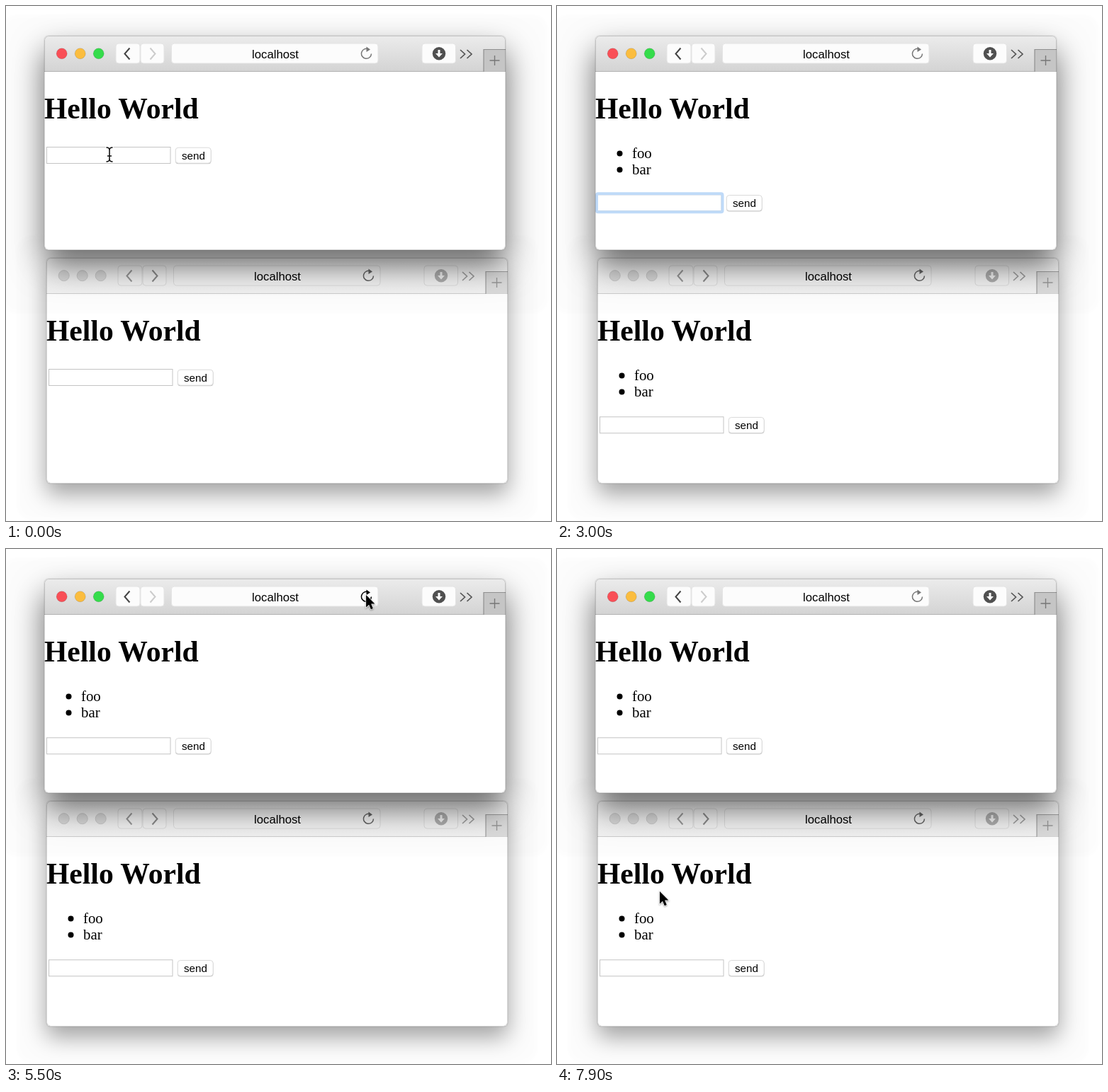
These frames come from a looping animation (769x728 px, 8000 ms). An HTML page:

```html
<!DOCTYPE html>
<html>
<head>
<meta charset="utf-8">
<style>
html, body { margin: 0; width: 100%; height: 100%; overflow: hidden; background: #fff; }
.win { position: absolute; width: 651px; border-radius: 6px; background: #fff; }
.win svg { display: block; border-radius: 6px; }
#front { left: 54px; top: 42px; height: 303px;
  box-shadow: 0 0 1px rgba(0,0,0,.6), 0 22px 45px rgba(0,0,0,.58), 0 30px 4px 60px rgba(0,0,0,.012); }
#back { left: 56.5px; top: 356px; height: 319px;
  box-shadow: 0 0 1px rgba(0,0,0,.6), 0 15px 32px rgba(0,0,0,.36), 0 10px 4px 42px rgba(0,0,0,.012); }
#pointer { position: absolute; left: 0; top: 0; }
text { font-family: "Liberation Sans", Arial, sans-serif; font-size: 15.2px; }
.page { font-family: "Liberation Serif", Times, serif; font-size: 20.8px; }
.title { font-size: 41.6px; font-weight: bold; }
.mid { text-anchor: middle; }
</style>
</head>
<body>
<div class="win" id="back"></div>
<div class="win" id="front"></div>
<svg id="pointer" width="769" height="728">
  <g id="beam" fill="none" stroke-linecap="round">
    <path id="beamShape" d="M-4-10Q0-10 0-6Q0-10 4-10M0-6V6M-4 10Q0 10 0 6Q0 10 4 10M-2.5 2H2.5" stroke="#fff" stroke-width="3.4"/>
    <use href="#beamShape" style="stroke:#000"/>
    <path d="M-4-10Q0-10 0-6Q0-10 4-10M0-6V6M-4 10Q0 10 0 6Q0 10 4 10M-2.5 2H2.5" stroke="#111" stroke-width="1.6"/>
  </g>
  <path id="arrow" d="M0 0V17.5L4 13.7 6.8 20.2 9.8 18.9 7.1 12.6H12.4Z" stroke="#fff" stroke-width="1.4"
    style="paint-order:stroke;filter:drop-shadow(0 1px 1px rgba(0,0,0,.4))"/>
</svg>
<script>
const $ = id => document.getElementById(id);
const ACTIVE = { top: '#ececec', bottom: '#d3d3d3', line: '#b2b2b2', button: '#fcfcfc', edge: '#e4e4e4',
  lights: ['#f94f57', '#fbbd3f', '#35dc4b'], rim: 'rgba(0,0,0,.12)',
  back: '#444', next: '#ccc', icon: '#505050', more: '#555', reload: '#777', tab: '#c5c5c5', tabEdge: '#8f8f8f', plus: '#777' };
const IDLE = { top: '#f6f6f6', bottom: '#f4f4f4', line: '#cfcfcf', button: '#f6f6f6', edge: '#dedede',
  lights: ['#dcdcdc', '#dcdcdc', '#dcdcdc'], rim: '#cdcdcd',
  back: '#999', next: '#8c8c8c', icon: '#b0b0b0', more: '#a0a0a0', reload: '#666', tab: '#dedede', tabEdge: '#a0a0a0', plus: '#999' };

function buildWindow(id, height, c) {
  const button = (x, w) =>
    `<rect x="${x}" y="11" width="${w}" height="28" rx="4" fill="${c.button}" stroke="${c.edge}"/>`;
  const line = (d, color, w = 1.8) => `<path d="${d}" fill="none" stroke="${color}" stroke-width="${w}"/>`;
  const item = (word, y) => `<g class="item"><circle cx="34.5" cy="${y - 6.5}" r="4"/>
    <text class="page" x="52" y="${y}">${word}</text></g>`;
  $(id).innerHTML = `<svg width="651" height="${height}">
    <linearGradient id="${id}Bar" x2="0" y2="1"><stop stop-color="${c.top}"/><stop offset="1" stop-color="${c.bottom}"/></linearGradient>
    <rect width="651" height="51" fill="url(#${id}Bar)"/>
    <rect y="50" width="651" height="1" fill="${c.line}"/>
    ${c.lights.map((f, i) => `<circle cx="${24.7 + 26 * i}" cy="25.2" r="7.5" fill="${f}" stroke="${c.rim}"/>`).join('')}
    ${button(101, 34)}${button(136, 33)}${button(179.5, 291.5)}${button(533, 47.5)}
    ${line('M120.5 17.5L113.5 25.5 120.5 33.5', c.back, 2)}${line('M149.5 17.5L156.5 25.5 149.5 33.5', c.next, 2)}
    <text class="mid" x="326" y="31.5" style="font-size:16.7px">localhost</text>
    <g class="reload" color="${c.reload}">
      ${line('M457.5 19A7 7 0 1 0 461.5 25.5', 'currentColor', 1.5)}
      <path d="M454.5 15.5L460 19.5 454.5 23Z" fill="currentColor"/>
    </g>
    <circle cx="557" cy="25.2" r="9.2" fill="${c.icon}"/>
    <path d="M555.5 20H558.5V25H562L557 30.5 552 25H555.5Z" fill="${c.button}"/>
    ${line('M587 20L593.5 26 587 32M596.5 20L603 26 596.5 32', c.more, 1.7)}
    <rect x="620" y="19.5" width="32" height="31" fill="${c.tab}"/>
    ${line('M620 51V19.5H651', c.tabEdge, 1.2)}${line('M628.5 35H642.5M635.5 28V42', c.plus, 1.4)}
    <text class="page title" x="0" y="117">Hello World</text>
    ${item('foo', 173)}${item('bar', 196)}
    <g class="form">
      <rect x="3.5" y="157.5" width="174.5" height="23" fill="#fff" stroke="#c4c4c4"/>
      <rect class="ring" x="2" y="156" width="177.5" height="26" rx="2" fill="none" stroke="#bfdaf8" stroke-width="4"/>
      <text class="typed" x="6.3" y="174.7" style="font-size:15.6px"></text>
      <rect class="caret" y="161.5" width="1.2" height="16.5"/>
      <rect x="185" y="159" width="50.5" height="22.3" rx="4" fill="#c4c4c4"/>
      <rect x="185.2" y="158.2" width="50" height="22" rx="4" fill="#fff" stroke="#d6d6d6" stroke-width=".9"/>
      <text class="mid" x="210.4" y="175.2">send</text>
    </g>
    <rect x=".5" y=".5" width="650" height="${height - 1}" rx="6" fill="none" stroke="rgba(0,0,0,.16)"/>
  </svg>`;
}
buildWindow('front', 303, ACTIVE);
buildWindow('back', 319, IDLE);

const typing = [[0, ''], [800, 'f'], [900, 'fo'], [1100, 'foo'], [1800, ''],
  [2100, 'b'], [2200, 'ba'], [2300, 'bar'], [2500, '']];
const caretTimes = [[0, 0], [300, 1], [2900, 0], [3400, 1], [3800, 0]];
const shapes = [[0, 'beam'], [800, ''], [3800, 'beam'], [4100, 'arrow']];
const path = [[0, 146, 210], [3800, 150, 205], [3900, 340, 125], [4000, 518, 67], [4100, 560, 54],
  [4200, 567, 50], [4300, 550, 55], [4400, 520, 63], [4500, 509, 65], [5600, 508, 65], [5800, 475, 80],
  [6000, 330, 165], [6200, 200, 235], [6400, 154, 256], [6500, 154, 256], [6600, 159, 257],
  [7000, 159, 257], [7100, 161, 256], [7200, 161, 256], [7500, 155, 330], [7800, 146, 470], [7900, 145, 484]];

const latest = (list, t) => list.filter(k => k[0] <= t).pop()[1];

function pointAt(t) {
  const i = path.findIndex(k => k[0] > t);
  if (i < 0) return path[path.length - 1].slice(1);
  const a = path[i - 1], b = path[i], u = (t - a[0]) / (b[0] - a[0]);
  return [1, 2].map(n => a[n] + (b[n] - a[n]) * u);
}
const show = (el, on) => el.style.display = on ? '' : 'none';

function draw(now) {
  const t = Math.floor(now % 8000 / 100) * 100;
  const items = t < 1800 ? 0 : t < 2500 ? 1 : 2;
  const focused = t >= 300 && t < 4500;
  for (const id of ['front', 'back']) {
    const win = $(id);
    win.querySelectorAll('.item').forEach((el, i) => show(el, i < items));
    win.querySelector('.form').setAttribute('transform', `translate(0 ${[0, 44, 67.3][items]})`);
    show(win.querySelector('.ring'), id === 'front' && focused);
    show(win.querySelector('.caret'), id === 'front' && focused && latest(caretTimes, t));
  }
  const typed = $('front').querySelector('.typed');
  typed.textContent = latest(typing, t);
  $('front').querySelector('.caret').setAttribute('x', 6.8 + typed.getComputedTextLength());
  $('front').querySelector('.reload').setAttribute('color', t >= 4500 && t < 5800 ? '#000' : ACTIVE.reload);
  const shape = latest(shapes, t);
  for (const id of ['beam', 'arrow']) {
    show($(id), id === shape);
    $(id).setAttribute('transform', `translate(${pointAt(t)})`);
  }
}
const start = performance.now();
(function tick() {
  draw(performance.now() - start);
  requestAnimationFrame(tick);
})();
</script>
</body>
</html>
```
